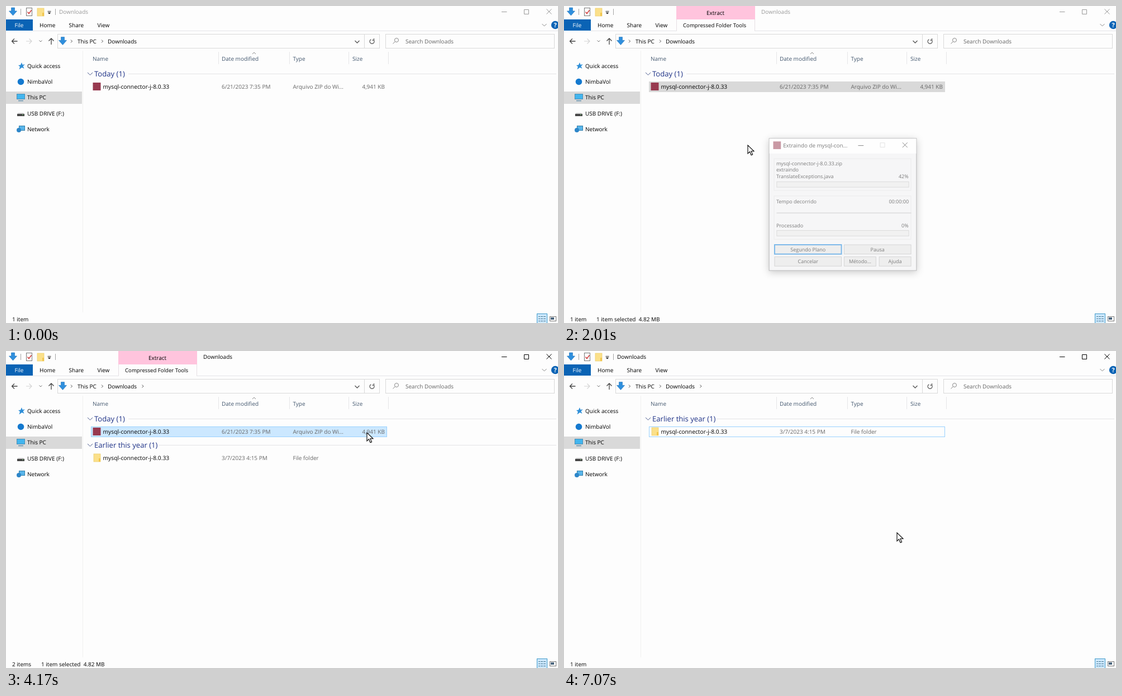
Animation, 988 px wide and 567 px high, one loop 7.17 s. Source, as an HTML page:

```html
<!DOCTYPE html>
<html lang="en">
<head>
<meta charset="utf-8">
<title>Extracting an archive</title>
<style>
html, body { margin: 0; width: 100%; height: 100%; overflow: hidden; background: #fdfdfd; }
svg { display: block; width: 988px; height: 567px; }
text { font: 10px "Open Sans", "Noto Sans", sans-serif; fill: #000; white-space: pre; text-rendering: geometricPrecision; }
.line { fill: none; stroke: #444; }
.head { fill: #44586f; }
.soft { fill: #666; }
.group { fill: #1e3287; font-size: 13.1px; }
.dlg text { font-size: 9.2px; }
.menu { filter: drop-shadow(2px 2px 1px #0008); }
.dlg { filter: drop-shadow(0 3px 7px #0006); transform-origin: 498.5px 354.5px; }
</style>
</head>
<body>
<svg id="stage" viewBox="0 0 988 567"></svg>
<script>
const LOOP = 7170;
const FILE = "mysql-connector-j-8.0.33";

// Markup helpers
const rect = (x, y, w, h, fill, stroke = "none", more = "") =>
  `<rect x="${x}" y="${y}" width="${w}" height="${h}" fill="${fill}" stroke="${stroke}" ${more}/>`;
const path = (d, color = "#444", more = "") =>
  `<path d="${d}" class="line" style="stroke:${color}" ${more}/>`;
const shape = (d, fill, more = "") => `<path d="${d}" fill="${fill}" ${more}/>`;
const dot = (x, y, r, fill) => `<circle cx="${x}" cy="${y}" r="${r}" fill="${fill}"/>`;
const text = (x, y, s, style = "", more = "") =>
  `<text x="${x}" y="${y}" style="${style}" ${more}>${s}</text>`;
const right = "text-anchor:end;";
const mid = "text-anchor:middle;";

const archive = (x, y) => rect(x, y, 14, 14, "#983a50");
const folder = (x, y) =>
  rect(x, y, 12, 14, "#fbe08a", "#eccb68", 'stroke-width=".7"') +
  rect(x + 9, y + 8, 3, 6, "#f1c64e");
const downArrow = (x, y) =>
  shape(`M${x - 3} ${y - 7}h6v6h4l-7 8-7-8h4z`, "#2f8fdd", 'stroke="#1c6fb8" stroke-width=".6"');
const rightTick = (x, y) => path(`M${x} ${y - 2.5}l2.5 2.5-2.5 2.5`, "#555");

function groupHead(y, label, from) {
  return path(`M146 ${y - 2}l4.5 4.5 4.5-4.5`, "#4a5a8c") +
    text(158, y + 5, label, "", 'class="group"') +
    path(`M${from} ${y + .5}H985`, "#e4e4e6");
}

function fileRow(id, icon, date, type, size) {
  return rect(152.5, 135.5, 529, 18, "none", "none", `id="${id}"`) + icon +
    text(173.5, 148, FILE, "font-size:10.3px") +
    text(386, 148, date, "", 'class="soft"') +
    text(513.5, 148, type, "", 'class="soft"') +
    text(678, 148, size, right, 'class="soft"');
}

function chrome() {
  const column = (x, label) => text(x, 97.5, label, "", 'class="head"');
  return rect(0, 0, 988, 567, "#fdfdfd") +
    downArrow(12.5, 10) + path("M26.5 5v11M88.5 5v11", "#a5a5a5") +
    rect(36.5, 3.5, 10, 14, "#fff", "#777") + path("M38.5 10.5l2.5 3 4.5-6", "#d23b3b", 'stroke-width="1.5"') +
    folder(56, 4) + path("M74.5 9.5h6", "#333") + shape("M74.5 11.5h6l-3 3z", "#222") +
    rect(0, 24, 48, 20, "#0a63b5") + text(23.5, 38, "File", mid + "fill:#fff") +
    text(60, 38, "Home") + text(112.5, 38, "Share") + text(163.5, 38, "View") +
    path("M48 44.5H988", "#e4e4e8") + path("M959.5 32l4 4 4-4", "#888") +
    dot(983, 34, 7.2, "#0a63b5") + text(983, 38, "?", mid + "fill:#fff;font-weight:700;font-size:11px") +
    // Address bar
    path("M20.5 63H10.5m4.5-4.5l-4.5 4.5 4.5 4.5", "#444", 'stroke-width="1.3"') +
    path("M36 63h10m-4.5-4.5l4.5 4.5-4.5 4.5", "#d4d4d4", 'stroke-width="1.2"') +
    path("M59.5 61.5l2.5 2.5 2.5-2.5", "#777") +
    path("M81 69V58m-4.5 4.5L81 58l4.5 4.5", "#444", 'stroke-width="1.3"') +
    rect(92.5, 50.5, 576, 25, "#fdfdfd", "#d9d9d9") + path("M641.5 51v24", "#d9d9d9") +
    downArrow(101.5, 62.5) + rightTick(116, 63) + text(128, 66.5, "This PC") +
    rightTick(171, 63) + text(182, 66.5, "Downloads") +
    path("M624.5 62l4 4 4-4", "#555", 'stroke-width="1.3"') +
    path("M657.8 60.5a4 4 0 1 1-4.6-.6M658.5 58v3.2h-3.2", "#555", 'stroke-width="1.2"') +
    rect(679.5, 50.5, 302, 25, "#fdfdfd", "#d9d9d9") +
    '<circle cx="699" cy="61" r="3.5" class="line" style="stroke:#888"/>' + path("M696.5 63.5l-4 4", "#888") +
    text(715, 66.5, "Search Downloads", "", 'class="soft"') +
    // Columns
    path("M380.5 82v22M507.5 82v22M613.5 82v22M684.5 82v22", "#e6e6e8") +
    path("M441 86l3-3 3 3", "#888") +
    column(155, "Name") + column(386, "Date modified") + column(513.5, "Type") + column(620, "Size") +
    // Navigation
    path("M137.5 80V548", "#f1f1ef") + rect(0, 153, 136, 22, "#d9d9d9") +
    shape("M28 101l1.5 4 4.5-.5-3.5 3 2 4.5-4-2-5 3.5 1.5-5-3-2.5 4-.5z", "#2f8fd8") +
    dot(26.5, 135.5, 5.8, "#1479cf") +
    rect(19.5, 157.5, 14, 9, "#43b5ee", "#4b8fb5") + path("M22 169.5h9", "#5c8fae", 'stroke-width="1.5"') +
    shape("M22 191h9l2 2H20z", "#d5d5d5") + rect(20, 193, 13, 4, "#454545") + rect(29, 194, 2, 1, "#7ad47a") +
    rect(23.5, 214.5, 10, 8, "#58b5ea", "#337ea8") + dot(23, 222, 4, "#2d86c9") +
    text(38, 110.5, "Quick access") + text(38, 139, "NimbaVol") + text(38, 167, "This PC") +
    text(38, 195.5, "USB DRIVE (F:)") + text(38, 224, "Network") +
    // View switches
    rect(950.5, 550.5, 18, 18, "#cce8ff", "#3f9ac9") +
    [555, 559, 563].map(y => path(`M953 ${y}.5h3m1 0h4m1 0h4`, "#48788e")).join("") +
    rect(973.5, 555.5, 11, 8, "#fff", "#777") + rect(975, 557, 6, 4, "#4a657e");
}

const ribbon = () =>
  rect(201, 0, 141, 24, "#ffc4dd") + rect(202, 24, 139, 22, "#fdfdfd") +
  path("M201.5 24v20M341.5 24v20", "#e6dfe4") +
  text(271, 16, "Extract", mid) + text(213, 38, "Compressed Folder Tools", "font-size:9.65px");

// Context menu: "-" opens a new section, ">" marks a submenu
const ENTRIES = ["Open", "Share with Plomi", "Open with Trel", "Abrir com o Zupfek", "Extrair arquivos...",
  "Extrair aqui", `Extrair para "${FILE}\\"`, "Scan with Velmarost Shielder...", "Share", "Open with>",
  "-Give access to>", "Restore previous versions", "-Send to>", "-Cut", "Copy",
  "-Create shortcut", "Delete", "Rename", "-Properties"];
let step = 12.8 - 19.55;
const entryY = ENTRIES.map(e => step += e[0] === "-" ? 25.65 : 19.55);

function menu() {
  let out = rect(-.5, .5, 285, 407, "#ebebeb", "#a3a3a3") + rect(1, 0, 282, 19.5, "#fdfdfd", "none", 'id="hover"');
  ENTRIES.forEach((e, i) => {
    const y = entryY[i], top = y - 7;
    if (e[0] === "-") out += path(`M9 ${y - 12.8}H276`, "#989898");
    if (e.endsWith(">")) out += path(`M269.5 ${y - 5}l5 5-5 5`, "#333");
    if (i === 1) out += dot(16.5, y, 6.5, "#1eaee9");
    if (i === 2) out += rect(10, top, 13, 13, "#2385cc");
    if (i > 2 && i < 7) out += archive(9, top);
    if (i === 7) out += rect(9, top, 14, 14, "#1b83d6");
    if (i === 8) out += path(`M13 ${y - 2}h-3v7h10v-3M13 ${y + 2}q1-5 6-5v-3l4 4-4 4v-2`, "#333");
    const style = i === 0 ? "font-weight:700" : e.includes(FILE) ? "font-size:10.2px" : "";
    out += text(30, y + 3.7, e.replace(/^-|>$/g, ""), style);
  });
  return out;
}

function dialog() {
  const button = (x, y, w, label, main) =>
    rect(x + .5, y + .5, w - 1, 17, "#e1e1e1", main ? "#0078d7" : "#b0b0b0", main ? 'stroke-width="2"' : "") +
    text(x + w / 2, y + 12.3, label, mid);
  const bar = (y, id) => rect(378.5, y + .5, 241, 10, "#e6e6e6", "#bcbcbc") +
    rect(379, y + 1, 0, 10, "#06b025", "none", `id="${id}"`);
  const box = (y, h) => rect(373.5, y + .5, 250, h, "none", "#dcdcdc");
  return rect(364.5, 234.5, 269, 241, "#f0f0f2", "#77777a") + rect(365, 235, 268, 27, "#fff") +
    archive(372, 240) + text(390, 250.5, "Extraindo de mysql-con...", "font-size:10px") +
    path("M527 247.5h10M608 242l9 9m0-9l-9 9", "#111") + rect(567.5, 242.5, 8, 8, "none", "#ccc") +
    box(271, 58) + text(377.5, 283.5, FILE + ".zip") + text(377.5, 295, "extraindo") +
    text(377.5, 307, "", "", 'id="entry"') + text(619, 307, "", right, 'id="part"') + bar(313, "partBar") +
    box(339, 79) + text(377.5, 353, "Tempo decorrido") + text(619.5, 353, "", right, 'id="spent"') +
    `<g id="left">${text(377.5, 365, "Tempo estimado") + text(619.5, 365, "00:00:00", right)}</g>` +
    path("M378 370.5H624", "#a2a2a4") +
    text(377.5, 397, "Processado") + text(619, 397, "", right, 'id="total"') + bar(402, "totalBar") +
    button(374, 428, 123, "Segundo Plano", true) + button(501, 428, 123, "Pausa") +
    button(374, 450, 123, "Cancelar") + button(501, 450, 59, "Método...") + button(565, 450, 59, "Ajuda");
}

const stage = document.getElementById("stage");
const layer = (id, body, more = "") => `<g id="${id}" ${more}>${body}</g>`;
stage.innerHTML = chrome() + layer("ribbon", ribbon()) + text(95, 14, "Downloads", "", 'id="title"') +
  path("M887 10.5h9.5M927.5 6.5h8v8h-8zM967.5 5.5l9 9m0-9l-9 9", "", 'id="controls"') +
  layer("crumb", rightTick(243.5, 63)) +
  layer("zip", groupHead(121, "Today (1)", 219) +
    fileRow("zipBack", archive(155.5, 137), "6/21/2023 7:35 PM", "Arquivo ZIP do Wi...", "4,941 KB")) +
  layer("dir", groupHead(121, "Earlier this year (1)", 274) +
    fileRow("dirBack", folder(157, 137), "3/7/2023 4:15 PM", "File folder", "")) +
  text(11, 564, "", "", 'id="count"') + text(58, 564, "1 item selected  4.82 MB", "", 'id="picked"') +
  layer("menu", menu(), 'class="menu"') + layer("dialog", dialog(), 'class="dlg"') +
  layer("cursor", shape("M0 0v15l3.5-3.3 2.6 6 2.5-1.1-2.6-5.8h5z", "#fff", 'stroke="#000" stroke-width="1.1"'));

const ui = {};
stage.querySelectorAll("[id]").forEach(el => ui[el.id] = el);
const set = (id, attrs) => { for (const k in attrs) ui[id].setAttribute(k, attrs[k]); };
const show = (id, on) => { ui[id].style.display = on ? "" : "none"; };
const say = (id, s) => { ui[id].textContent = s; };
const clamp = v => Math.max(0, Math.min(1, v));

// Pointer stops: time, x, y
const STOPS = [[60, 470, 590], [560, 264, 147], [780, 264, 147], [940, 281, 171], [1400, 312, 256],
  [1700, 312, 256], [2010, 329, 249], [2300, 329, 249], [2900, 298, 166], [3250, 298, 166],
  [3900, 646, 146], [4550, 646, 146], [5900, 711, 513], [6020, 711, 513], [6220, 702, 500],
  [6400, 702, 500], [7000, 596, 325]];

function pointer(t) {
  const i = STOPS.findIndex(s => s[0] > t);
  if (i < 1) return (i ? STOPS[STOPS.length - 1] : STOPS[0]).slice(1);
  const [t0, x0, y0] = STOPS[i - 1], [t1, x1, y1] = STOPS[i];
  const p = (t - t0) / (t1 - t0), e = p * p * (3 - 2 * p);
  return [x0 + (x1 - x0) * e, y0 + (y1 - y0) * e];
}

const MENUS = [{ from: 680, to: 1640, x: 264, y: 146.5 }, { from: 4330, to: 6330, x: 647, y: 150 }];
const ENTRY_NAMES = ["TranslateExceptions.java", "ConnectionImpl.java", "ResultSetTest.java",
  "StatementsTest.java", "MetadataTest.java", "BasePerfTest.java"];

function drawMenu(t) {
  const m = MENUS.find(m => t >= m.from && t < m.to);
  show("menu", m);
  if (!m) return;
  set("menu", { transform: `translate(${m.x} ${m.y})`, opacity: clamp((t - m.from) / 120) });
  // The highlight trails the pointer slightly
  const [x, y] = pointer(t - 60);
  const i = entryY.findIndex(c => Math.abs(y - m.y - c) <= 9.8);
  show("hover", i >= 0 && x >= m.x);
  if (i >= 0) set("hover", { y: entryY[i] - 9.75 });
}

function drawDialog(t) {
  const on = t > 1950 && t < 3330;
  show("dialog", on);
  if (!on) return;
  const p = clamp(Math.min((t - 1950) / 120, (3330 - t) / 100));
  ui.dialog.style.opacity = p;
  ui.dialog.style.transform = `scale(${.96 + .04 * p})`;
  const done = clamp((t - 2060) / 1132), started = t >= 2060;
  say("entry", ENTRY_NAMES[Math.min(5, Math.floor(done * 7.2))]);
  say("part", started ? "100%" : "42%");
  say("spent", t < 2900 ? "00:00:00" : "00:00:01");
  say("total", Math.round(done * 100) + "%");
  show("left", started);
  set("partBar", { width: started ? 240 : 0 });
  set("totalBar", { width: 240 * done * .77 });
}

function draw(t) {
  const active = t >= 640 && t < 1950 || t >= 3290;
  const extracted = t >= 3340, deleted = t >= 6480;
  const picked = t >= 640 && !deleted;
  const [x, y] = pointer(t);
  const over = y > 135 && y < 154 && x > 152 && x < 682;

  show("ribbon", picked);
  set("title", { x: picked ? 353 : 95 });
  ui.title.style.fill = active ? "#000" : "#999";
  ui.controls.style.stroke = active ? "#000" : "#999";
  show("crumb", extracted);
  show("zip", !deleted);
  set("zipBack", picked
    ? { fill: active ? "#cce8ff" : "#d9d9d9", stroke: active ? "#99d1ff" : "#d9d9d9" }
    : { fill: over ? "#e5f3ff" : "none", stroke: "none" });
  show("dir", extracted);
  set("dir", { transform: `translate(0 ${deleted ? 0 : 47})` });
  set("dirBack", { stroke: deleted ? "#99d1ff" : "none" });
  say("count", extracted && !deleted ? "2 items" : "1 item");
  show("picked", picked);
  set("picked", { x: extracted ? 63 : 58 });
  drawMenu(t);
  drawDialog(t);
  show("cursor", t >= 60);
  set("cursor", { transform: `translate(${x} ${y})` });
}

const start = performance.now();
function tick() {
  draw((performance.now() - start) % LOOP);
  requestAnimationFrame(tick);
}
draw(0);
requestAnimationFrame(tick);
</script>
</body>
</html>
```
